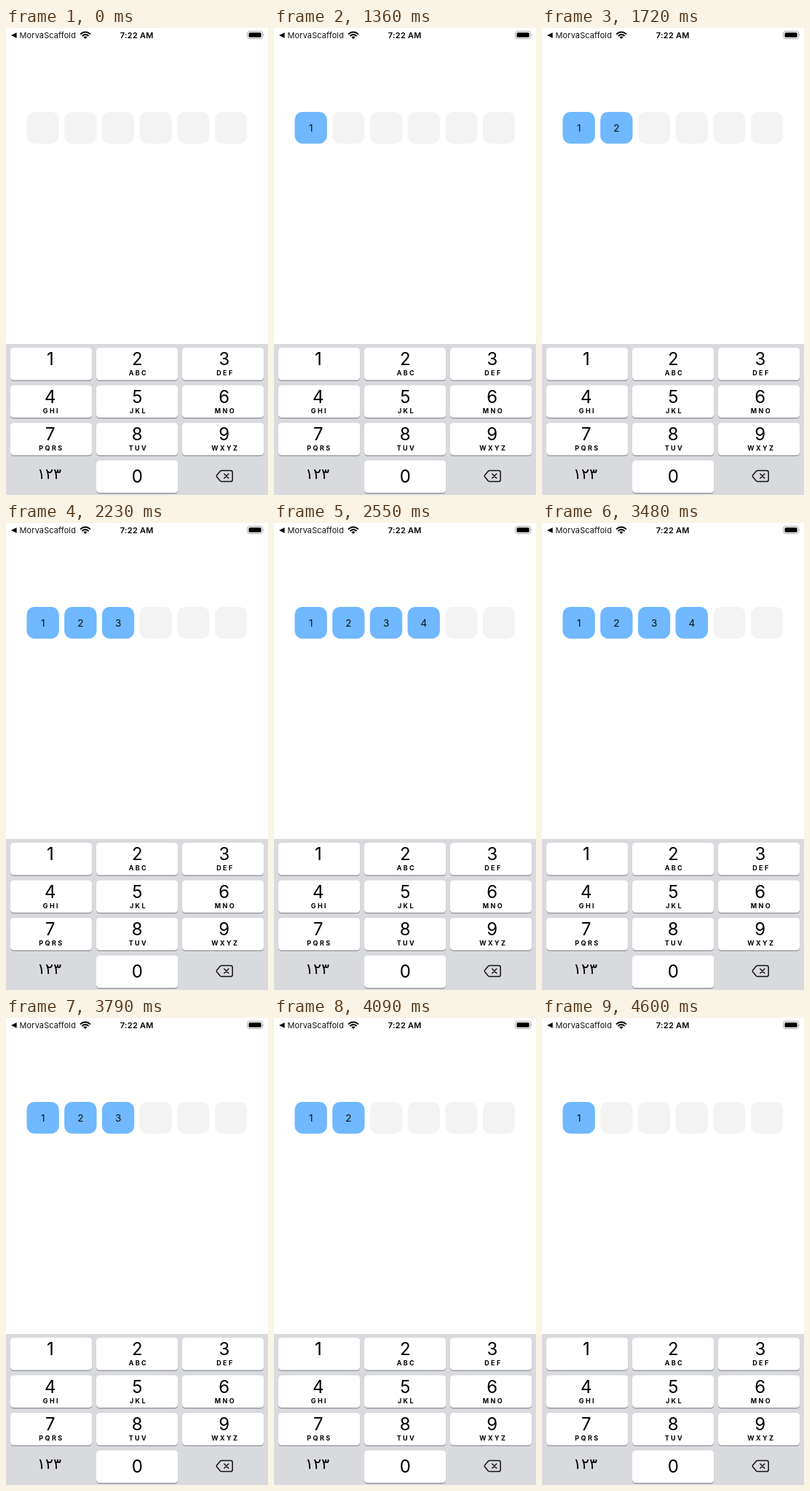
These frames come from a looping animation (360 by 640 pixels, 5.16 s). An HTML page:

```html
<!DOCTYPE html>
<html lang="en">
<head>
<meta charset="utf-8">
<title>Code entry</title>
<style>
  html, body { margin: 0; width: 100%; height: 100%; overflow: hidden; background: #fff; }
  svg { display: block; width: 360px; height: 640px; font-family: Inter, "Open Sans", sans-serif; }
  .status { font-size: 11px; letter-spacing: .1px; fill: #111; }
  .time { font-size: 11px; font-weight: 600; letter-spacing: .25px; text-anchor: middle; }
  .digit { font-size: 24px; text-anchor: middle; }
  .letters { font-size: 9px; font-weight: 700; letter-spacing: 2.4px; text-anchor: middle; }
  .code { font-size: 13.5px; text-anchor: middle; fill: #111; }
  .numerals { font-family: "DejaVu Sans", sans-serif; font-size: 20.5px; text-anchor: middle; }
</style>
</head>
<body>
<svg id="stage" viewBox="0 0 360 640">
  <rect width="360" height="640" fill="#fff"/>

  <path d="M7 10 L14.6 6.3 V13.7 Z"/>
  <text class="status" x="18.5" y="13.7">MorvaScaffold</text>
  <g fill="none" stroke="#000" stroke-width="1.9">
    <path d="M102 8.6 Q109 2.6 116 8.6"/>
    <path d="M104.4 11 Q109 7.2 113.6 11"/>
  </g>
  <path d="M106.4 12.4 Q109 10.4 111.6 12.4 L109 15 Z"/>
  <text class="time" x="179.8" y="13.8">7:22 AM</text>
  <rect x="331.6" y="4.4" width="21" height="10.2" rx="3" fill="none" stroke="#a6a6a6"/>
  <rect x="333.5" y="6.2" width="17.2" height="6.6" rx="1.6"/>
  <path d="M353.6 7.8 Q355.2 9.5 353.6 11.2 Z" fill="#a6a6a6"/>

  <g id="cells"></g>

  <rect y="433" width="360" height="207" fill="#d9dade"/>
  <g id="keys"></g>
  <text class="numerals" x="59.5" y="618" direction="ltr">١٢٣</text>
  <g fill="none" stroke="#111" stroke-width="1.5" stroke-linecap="round" stroke-linejoin="round">
    <path d="M296.2 606.4 H308.6 Q311.2 606.4 311.2 609 V619 Q311.2 621.6 308.6 621.6 H296.2 Q295.2 621.6 294.4 620.8 L289.7 615.2 Q288.8 614 289.7 612.8 L294.4 607.2 Q295.2 606.4 296.2 606.4 Z"/>
    <path d="M299.8 611 L305.8 617 M305.8 611 L299.8 617"/>
  </g>
</svg>
<script>
  const LOOP = 5160;
  // When each cell fills and empties, in ms
  const FILLED = [[1360, 5160], [1720, 4600], [2230, 4090], [2550, 3790], [2670, 3480]];
  const LETTERS = ["", "ABC", "DEF", "GHI", "JKL", "MNO", "PQRS", "TUV", "WXYZ"];

  function add(parent, tag, attrs, text) {
    const el = document.createElementNS("http://www.w3.org/2000/svg", tag);
    for (const name in attrs) el.setAttribute(name, attrs[name]);
    if (text) el.textContent = text;
    parent.appendChild(el);
    return el;
  }

  const keys = document.getElementById("keys");
  function key(col, row, digit, letters) {
    const y = 438.2 + row * 51.5, mid = 60.8 + col * 119.5;
    const box = { x: 6 + col * 118, width: 112.2, height: 44.4, rx: 4.5 };
    add(keys, "rect", { ...box, y: y + 1.1, fill: "#8e8f94" });
    add(keys, "rect", { ...box, y, fill: "#fff" });
    add(keys, "text", { class: "digit", x: mid, y: y + (row < 3 ? 24.2 : 30.6) }, digit);
    if (letters) add(keys, "text", { class: "letters", x: mid + 1.6, y: y + 37.8 }, letters);
  }
  LETTERS.forEach((letters, i) => key(i % 3, Math.floor(i / 3), String(i + 1), letters));
  key(1, 3, "0");

  const cells = document.getElementById("cells");
  for (let i = 0; i < 6; i++) {
    const x = 28.5 + i * 51.7;
    const box = { x, y: 115, width: 44.3, height: 43.4, rx: 10.5 };
    add(cells, "rect", { ...box, fill: "#f3f3f3" });
    if (!FILLED[i]) continue;

    const full = add(cells, "g", { opacity: 0 });
    add(full, "rect", { ...box, fill: "#70b8ff" });
    add(full, "text", { class: "code", x: x + 22.2, y: 141.6 }, String(i + 1));

    const [on, off] = FILLED[i];
    const step = (opacity, at) => ({ opacity, offset: at / LOOP, easing: "steps(1, end)" });
    full.animate([step(0, 0), step(1, on), step(0, off), step(0, LOOP)],
      { duration: LOOP, iterations: Infinity });
  }
</script>
</body>
</html>
```
